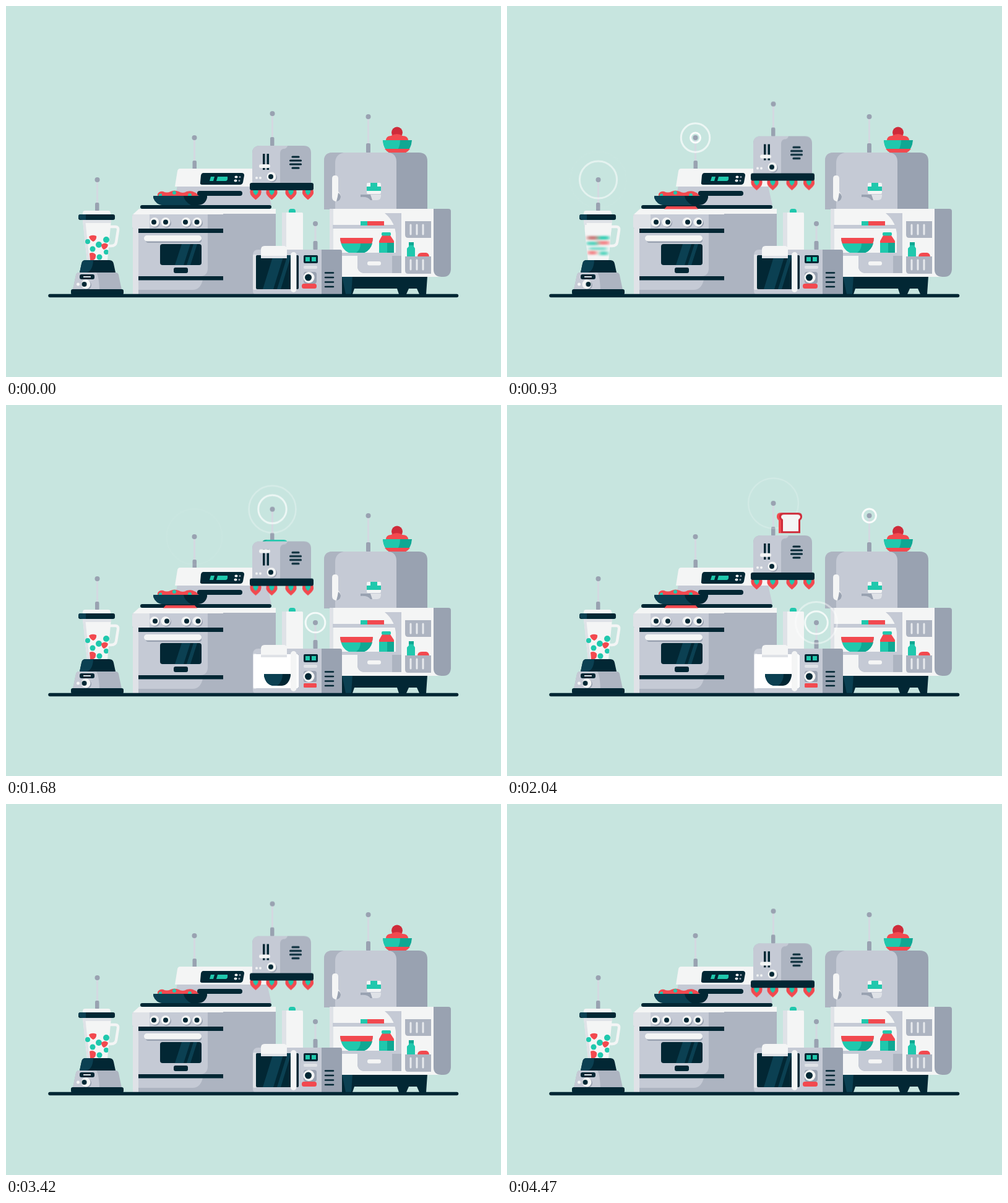
Animation, 800 px wide and 600 px high, one loop 4500 ms. Source, as an HTML page without scripts:

```html
<!DOCTYPE html>
<html lang="en">
<head>
<meta charset="utf-8">
<title>Connected kitchen</title>
<style>
html, body { margin: 0; width: 100%; height: 100%; overflow: hidden; background: #c7e5df; }
svg { display: block; width: 100vw; height: 100vh; }
.ink { fill: #022734; }
.ink2 { fill: #0b4052; }
.white { fill: #f4f5f5; }
.pale { fill: #dfe2e7; }
.light { fill: #c5cad5; }
.grey { fill: #adb4c1; }
.steel { fill: #99a2b1; }
.red { fill: #f2494f; }
.wine { fill: #cf2b3a; }
.teal { fill: #20c8ad; }
.sea { fill: #0fa893; }
.line { fill: none; stroke-linecap: round; }

.ring {
  fill: none; stroke: #fff; stroke-width: 3px; opacity: 0;
  animation: ring 4.5s linear infinite;
  animation-delay: calc(var(--at) * 1ms);
}
.ring + .ring { animation-delay: calc(var(--at) * 1ms + 310ms); }
@keyframes ring {
  0% { r: 3.5px; opacity: 1; }
  5% { opacity: .85; }
  13% { opacity: .48; stroke-width: 3px; }
  19.2% { r: 46px; opacity: 0; stroke-width: 2px; }
  100% { r: 46px; opacity: 0; }
}

.hover { animation: hover .75s cubic-bezier(.2, .2, .6, 1) infinite alternate; }
@keyframes hover { to { transform: translateY(-17px); } }

.toast1, .toast2 { animation: pop1 4.5s linear infinite; }
.toast2 { animation-name: pop2; }
@keyframes pop1 {
  0%, 27.33% { transform: none; animation-timing-function: cubic-bezier(.33, .67, .67, 1); }
  32.44% { transform: translateY(-45px); animation-timing-function: cubic-bezier(.33, 0, .67, .33); }
  37.56%, 100% { transform: none; }
}
@keyframes pop2 {
  0%, 37.78% { transform: none; animation-timing-function: cubic-bezier(.33, .67, .67, 1); }
  42.67% { transform: translateY(-52px); animation-timing-function: cubic-bezier(.33, 0, .67, .33); }
  47.78%, 100% { transform: none; }
}
.lever { animation: lever 4.5s infinite; }
@keyframes lever {
  0%, 26.5%, 46.8%, 100% { transform: none; }
  28.5%, 42.5% { transform: translateY(-17px); }
}

.blend { opacity: 0; animation: blend 4.5s linear infinite; }
.fruit { animation: fruit 4.5s linear infinite; }
@keyframes blend { 0%, 3% { opacity: 0; } 5%, 23% { opacity: 1; } 25%, 100% { opacity: 0; } }
@keyframes fruit { 0%, 3% { opacity: 1; } 5%, 23% { opacity: 0; } 25%, 100% { opacity: 1; } }
.swirl { animation: swirl .12s linear infinite alternate; }
@keyframes swirl { from { transform: translateX(-2px); } to { transform: translateX(2px); } }
.dial { animation: dial 4.5s infinite; }
@keyframes dial { 0%, 2% { transform: none; } 5%, 22% { transform: translateX(5px); } 25%, 100% { transform: none; } }

.heat { opacity: 0; animation: heat 4.5s linear infinite; }
@keyframes heat { 0%, 15% { opacity: 0; } 19%, 51% { opacity: 1; } 55%, 100% { opacity: 0; } }
.turn { animation: turn 4.5s infinite; }
@keyframes turn { 0%, 14% { transform: none; } 17%, 50% { transform: translateX(2px); } 53%, 100% { transform: none; } }

.lit { opacity: 0; animation: lit 4.5s linear infinite; }
@keyframes lit { 0%, 35.5% { opacity: 0; } 37%, 72% { opacity: 1; } 73.5%, 100% { opacity: 0; } }
</style>
</head>
<body>
<svg viewBox="0 0 800 600">
<defs>
  <g id="knob">
    <circle class="steel" cx="1.5" cy="1.5" r="7.5"/>
    <circle class="white" r="7.5"/>
  </g>
  <circle id="dot" class="ink" r="4"/>
  <g id="berry">
    <path class="red" d="M-8 -2H8Q11 5 6 10Q2 14 0 15.500Q-2 14-6 10Q-11 5-8 -2Z"/>
    <path class="teal" d="M-4 -1H4Q5 5 0 8Q-5 5-4 -1Z"/>
  </g>
  <path id="slice" d="M5 0H30Q36 0 36 6Q36 10 33 12V33H2V12Q-1 10-1 6Q-1 0 5 0Z"/>
  <path id="crumb" class="white" d="M7 3H28Q33 3 33 7Q33 9 30 11V30H5V11Q2 9 2 7Q2 3 7 3Z"/>
  <filter id="blur" x="-30%" y="-30%" width="160%" height="160%"><feGaussianBlur stdDeviation="3 1.6"/></filter>
  <clipPath id="jar"><path d="M124 346H170L164 411H131Z"/></clipPath>
  <clipPath id="oven"><rect x="249" y="385" width="67" height="34" rx="4"/></clipPath>
  <clipPath id="micro"><rect x="404" y="403" width="69" height="55" rx="2"/></clipPath>
</defs>

<rect width="800" height="600" fill="#c7e5df"/>

<!-- stove -->
<g>
  <path class="line" d="M304.500 216V252" stroke="#d3d9e1" stroke-width="3"/>
  <rect class="steel" x="301.500" y="250" width="6.500" height="15" rx="2"/>
  <circle class="steel" cx="304.500" cy="213" r="4"/>
  <g style="--at:530">
    <circle class="ring" cx="304.500" cy="213"/><circle class="ring" cx="304.500" cy="213"/>
  </g>
  <path class="light" d="M282 263H409Q415 263 417 269L429 322H271Z"/>
  <path class="white" d="M281 263H409Q415 263 417 269L422 292H273L277 267Q278 263 281 263Z"/>
  <path class="ink" d="M319 270H381Q385 270 385 274L383 285Q382 289 378 289H317Q313 289 314 285L315 274Q316 270 319 270Z"/>
  <path class="teal" d="M331 276H337L335 283H329ZM342 276H358Q359 283 355 283H340Z"/>
  <g class="white"><ellipse cx="372" cy="276.500" rx="2.500" ry="2"/><ellipse cx="371" cy="282.500" rx="2.500" ry="2"/></g>
  <g class="steel"><circle cx="378" cy="276.500" r="1.500"/><circle cx="377" cy="282.500" r="1.500"/></g>

  <path class="white" d="M215 328H436V338H204Z"/>
  <path class="grey" d="M351 328H436V466H351Z"/>
  <path class="white" d="M322 328H436V336H340Z"/>
  <rect class="ink" x="217" y="322" width="212" height="6" rx="3"/>
  <path class="heat red" d="M258 324H305L309 328.500H254Z"/>

  <path class="pale" d="M205 358H216V466H205Z"/>
  <rect class="grey" x="214" y="360" width="137" height="106"/>
  <path class="light" d="M214 367H326V424Q326 437 313 437H214ZM214 443H318Q314 459 302 459H214Z"/>
  <rect class="grey" x="204" y="337" width="151" height="23" rx="3"/>
  <path class="light" d="M207 337H326V360H207Q204 360 204 357V340Q204 337 207 337Z"/>
  <path class="pale" d="M207 337H232V360H207Q204 360 204 357V340Q204 337 207 337Z"/>
  <g class="ink"><rect x="214" y="360" width="137" height="7"/><rect x="214" y="437" width="137" height="6.500"/><rect x="271" y="423" width="23" height="9" rx="3"/></g>
  <use href="#knob" x="240" y="349.500"/><use href="#knob" x="258" y="349.500"/>
  <use href="#knob" x="291" y="349.500"/><use href="#knob" x="309" y="349.500"/>
  <g class="turn">
    <use href="#dot" x="239" y="349.500"/><use href="#dot" x="258" y="349.500"/>
    <use href="#dot" x="290" y="349.500"/><use href="#dot" x="308.500" y="349.500"/>
  </g>
  <rect class="steel" x="226" y="374" width="90" height="9" rx="4"/>
  <rect class="white" x="223" y="371" width="93" height="9.500" rx="4.700"/>
  <g clip-path="url(#oven)">
    <rect class="ink" x="249" y="385" width="67" height="34"/>
    <path class="ink2" d="M284 385H298L287 419H273ZM303 385H309L298 419H292Z"/>
  </g>

  <path class="red" d="M245 308V304Q248 299 254 300Q260 303 266 300Q272 297 279 300Q286 304 292 300Q300 298 304 301Q310 303 311 308Z"/>
  <g class="teal"><circle cx="272" cy="302" r="3"/><path d="M246 308Q247 302 252 304V308Z"/><circle cx="297" cy="306" r="3"/></g>
  <rect class="ink" x="309" y="299" width="73" height="8" rx="4"/>
  <path class="ink" d="M238 307H325V310Q322 322 310 322H253Q242 321 238 310Z"/>
  <path class="ink2" d="M238 307H287Q288 316 299 322H253Q242 321 238 310Z"/>
</g>

<!-- blender -->
<g>
  <path class="line" d="M147.500 284V321" stroke="#d3d9e1" stroke-width="3"/>
  <rect class="steel" x="144" y="318" width="6.500" height="14" rx="2"/>
  <circle class="steel" cx="147.500" cy="281" r="4"/>
  <g style="--at:80">
    <circle class="ring" cx="147.500" cy="281"/><circle class="ring" cx="147.500" cy="281"/>
  </g>
  <path class="line" d="M169 357H177Q182 357 181 363L178 382Q177 388 170 388H166" stroke="#f4f5f5" stroke-width="4.500"/>
  <path class="white" d="M124 346H170L164 411H131Z"/>
  <path class="pale" d="M124 346H170V351H124ZM127 377L124 346H128L135 411H131Z"/>
  <g class="fruit" clip-path="url(#jar)">
    <g class="teal">
      <circle cx="132" cy="381" r="4"/><circle cx="150" cy="386" r="5"/><circle cx="162" cy="378" r="5"/>
      <circle cx="140" cy="393" r="4.500"/><circle cx="151" cy="406" r="4.500"/><circle cx="162" cy="398" r="4"/>
    </g>
    <g class="red">
      <path d="M134 373Q139 369 146 372Q147 378 141 381Q136 379 134 373Z"/>
      <path d="M154 386Q160 381 165 386Q164 392 158 394Q154 391 154 386Z"/>
      <path d="M135 400Q141 397 145 402Q146 409 141 411H136Z"/>
    </g>
  </g>
  <g class="blend" clip-path="url(#jar)">
    <rect class="white" x="126" y="354" width="43" height="57"/>
    <g class="swirl" filter="url(#blur)">
      <path class="teal" d="M131 372H166V378H131ZM134 390H162V395H134Z" opacity=".55"/>
      <path class="red" d="M131 372H149V378H131ZM146 380H166V386H146ZM132 396H146V402H132Z" opacity=".65"/>
      <path class="teal" d="M147 372H166V378H147ZM130 381H149V387H130ZM150 397H164V403H150Z" opacity=".75"/>
    </g>
  </g>
  <rect class="white" x="124" y="331" width="45" height="9" rx="4"/>
  <rect class="ink" x="117" y="337" width="59" height="9" rx="3"/>
  <path class="ink2" d="M119 337H129V346H124Q117 345 117 340Z"/>
  <path class="ink" d="M128 411H167Q173 411 174 417L177 431H119L122 417Q123 411 128 411Z"/>
  <path class="ink2" d="M128 411H141Q140 431 128 431H119L122 417Q123 411 128 411Z"/>
  <path class="grey" d="M118 431H177Q181 431 182 435L187 459H108L113 435Q114 431 118 431Z"/>
  <path class="light" d="M118 431H146Q150 436 151 459H108L113 435Q114 431 118 431Z"/>
  <rect class="ink" x="119" y="434" width="24" height="8" rx="3"/>
  <rect class="pale" x="125" y="437" width="12" height="2"/>
  <circle class="white" cx="116.500" cy="450" r="2.500"/>
  <use href="#knob" x="129" y="450"/>
  <use href="#dot" x="126.500" y="450" class="dial"/>
  <rect class="ink" x="105" y="458" width="85" height="9" rx="3"/>
</g>

<!-- toaster -->
<g class="hover">
  <path class="line" d="M430.500 178V214" stroke="#d3d9e1" stroke-width="3"/>
  <rect class="steel" x="427" y="212" width="6.500" height="15" rx="2"/>
  <circle class="steel" cx="430.500" cy="174" r="4"/>
  <g style="--at:980">
    <circle class="ring" cx="430.500" cy="174"/><circle class="ring" cx="430.500" cy="174"/>
  </g>
  <g class="toast1"><use class="sea" href="#slice" x="415" y="227"/><use class="teal" href="#slice" x="419" y="227"/><use href="#crumb" x="419" y="227"/></g>
  <g class="toast2"><use class="red" href="#slice" x="437" y="227"/><use class="wine" href="#slice" x="441" y="227"/><use href="#crumb" x="441" y="227"/></g>
  <path class="grey" d="M411 226H481Q493 226 493 238V287H398V238Q398 226 411 226Z"/>
  <path class="light" d="M411 226H455Q454 231 448 231Q443 232 443 239V287H398V238Q398 226 411 226Z"/>
  <path class="ink" d="M415 239H418.500V265H415ZM421.500 239H425V265H421.500Z"/>
  <rect class="lever white" x="409" y="256" width="18" height="6" rx="3"/>
  <path class="line" d="M463 244H473M459.500 250H476.500M459.500 256H476.500M463 262H473" stroke="#022734" stroke-width="3.200"/>
  <g class="white"><circle cx="405" cy="278" r="2"/><circle cx="411" cy="278" r="2"/></g>
  <use href="#knob" x="429" y="276"/><use href="#dot" x="428" y="276"/>
  <use href="#berry" x="403.500" y="298"/><use href="#berry" x="429.500" y="298"/>
  <use href="#berry" x="460.500" y="298"/><use href="#berry" x="488" y="298"/>
  <rect class="ink" x="394" y="286" width="103" height="12" rx="3"/>
</g>

<!-- fridge -->
<g>
  <path class="line" d="M585.500 183V224" stroke="#d3d9e1" stroke-width="3"/>
  <rect class="steel" x="582" y="222" width="7" height="16" rx="2"/>
  <circle class="steel" cx="585.500" cy="179" r="4"/>
  <g style="--at:1890">
    <circle class="ring" cx="585.500" cy="179"/><circle class="ring" cx="585.500" cy="179"/>
  </g>
  <circle class="wine" cx="632" cy="204.500" r="9"/>
  <path class="red" d="M614 218Q614 210 622 210Q632 204 641 210Q650 210 650 218Z"/>
  <path class="sea" d="M609 217H656Q655 231 646 237H619Q610 231 609 217Z"/>
  <path class="teal" d="M609 217H637Q637 230 629 237H619Q610 231 609 217Z"/>
  <path class="red" d="M612 231H653Q650 235 646 237H619Q615 235 612 231Z"/>
  <path class="steel" d="M528 237H667Q681 237 681 251V329H514V251Q514 237 528 237Z"/>
  <path class="light" d="M528 237H617Q631 238 631 252V329H514V251Q514 237 528 237Z"/>
  <path class="grey" d="M528 237H546Q532 240 532 254V329H514V251Q514 237 528 237Z"/>
  <path class="white" d="M527 279Q527 274 532 274Q537 274 537 279V300Q541 304 541 309Q540 316 534 316Q527 316 527 309Z"/>
  <path class="steel" d="M537 302Q541 305 541 309Q540 316 534 316Q536 309 537 302Z"/>
  <rect class="white" x="583" y="286" width="23" height="18" rx="2"/>
  <path class="teal" d="M589 286H600V292H606V299H583V292H589Z"/>
  <path class="steel" d="M573 305H606V308Q606 314 600 314H589Q585 308 573 309Z"/>
  <path class="pale" d="M589 305H606V308Q606 314 600 314H592Z"/>

  <path class="ink" d="M543 437H681L679 466H668L664 457H651L647 466H635L632 457H563L560 466H543Z"/>
  <path class="ink2" d="M543 437H560L558 466H549Z"/>
  <rect class="white" x="523" y="328" width="122" height="110"/>
  <path class="pale" d="M523 328H529V438H523Z"/>
  <path class="light" d="M612 335H639V399H630V372Q630 350 612 335Z"/>
  <rect class="light" x="528" y="354" width="111" height="6"/>
  <rect class="red" x="573" y="348" width="38" height="7"/><rect class="teal" x="573" y="348" width="11" height="7"/>
  <rect class="light" x="528" y="399" width="111" height="5"/>
  <path class="teal" d="M540 376H593Q591 394 579 399H554Q542 394 540 376Z"/>
  <path class="sea" d="M573 384H592Q589 395 579 399H566Q573 394 573 384Z"/>
  <path class="red" d="M540 375H593Q593 380 591 384H542Q540 380 540 375Z"/>
  <rect class="teal" x="603" y="380" width="24" height="19"/>
  <rect class="sea" x="616" y="380" width="11" height="19"/>
  <path class="red" d="M608 371H621L627 380V383H603V380Z"/>
  <rect class="teal" x="607" y="366" width="15" height="5.500" rx="2"/>
  <path class="grey" d="M568 404H639V432H579Q568 431 568 420Z"/>
  <path class="light" d="M568 404H624V432H579Q568 431 568 420Z"/>
  <rect class="white" x="584" y="413" width="22" height="6.500" rx="3"/>

  <path class="steel" d="M640 328H715Q719 328 719 332V426Q718 438 707 438H640Z"/>
  <path class="white" d="M639 328H691V426Q691 438 704 438H639Z"/>
  <path class="grey" d="M645 348H687V375H650Q645 375 645 370Z"/>
  <path class="teal" d="M651 382H659V389L661 392V406H648V392L651 389Z"/>
  <rect class="sea" x="651" y="382" width="8" height="5"/>
  <path class="red" d="M665 406Q665 399 672 399H679Q684 400 684 406Z"/>
  <path class="grey" d="M645 405H687V433H650Q645 433 645 428Z"/>
  <path class="line" d="M654 354V369M664 354V369M674 354V369M654 411V426M664 411V426M674 411V426" stroke="#e8eaee" stroke-width="3"/>
</g>

<!-- paper towel and microwave -->
<g>
  <rect class="teal" x="457" y="328" width="11" height="10" rx="4"/>
  <rect class="white" x="446" y="334" width="34" height="62" rx="2"/>
  <rect class="pale" x="446" y="334" width="7" height="58"/>
  <path class="line" d="M500 355V382" stroke="#d3d9e1" stroke-width="3"/>
  <rect class="steel" x="496.500" y="380" width="7" height="15" rx="2"/>
  <circle class="steel" cx="500" cy="352" r="4"/>
  <g style="--at:1430">
    <circle class="ring" cx="500" cy="352"/><circle class="ring" cx="500" cy="352"/>
  </g>
  <path class="steel" d="M508 394H540Q543 394 543 397V466H508Z"/>
  <path class="light" d="M408 394H510V466H403Q399 466 399 461V403Q399 394 408 394Z"/>
  <rect class="pale" x="399" y="402" width="6" height="57" rx="2"/>
  <g clip-path="url(#micro)">
    <rect class="ink" x="404" y="403" width="69" height="55"/>
    <path class="ink2" d="M432 403H449L432 458H415ZM455 403H461L444 458H438Z"/>
  </g>
  <g class="lit">
    <rect fill="#fff" x="400" y="403" width="73" height="55" rx="2"/>
    <path class="ink" d="M417 435H460V438Q457 453 446 454H431Q420 452 417 438Z"/>
    <path class="ink2" d="M417 435H447Q447 448 438 454H431Q420 452 417 438Z"/>
  </g>
  <path class="white" d="M418 388H450Q454 389 454 394V408H412V394Q412 388 418 388Z"/>
  <path class="pale" d="M412 404H454V408H412Z"/>
  <rect class="white" x="460" y="398" width="9.500" height="65" rx="4.700"/>
  <rect class="ink" x="481" y="403" width="23" height="13" rx="2"/>
  <path class="teal" d="M484 406H491V413H484ZM494 406H501V413H494Z"/>
  <rect class="pale" x="481" y="420" width="22" height="5" rx="2"/>
  <rect class="steel" x="481" y="430" width="21" height="19" rx="4"/>
  <circle class="white" cx="489.500" cy="439" r="9"/>
  <circle class="ink" cx="488.500" cy="439" r="5.500"/>
  <rect class="red" x="478" y="449" width="24" height="8" rx="3.500"/>
  <g class="lit">
    <rect class="light" x="477" y="448" width="26" height="10"/>
    <rect class="red" x="481" y="450" width="21" height="7" rx="1.500"/>
  </g>
  <path class="line" d="M516 431.500H529M516 439H529M516 446.500H529M516 454H529" stroke="#022734" stroke-width="2.500"/>
</g>

<path class="line" d="M71 468.500H728.500" stroke="#022734" stroke-width="5.500"/>
</svg>
</body>
</html>
```
